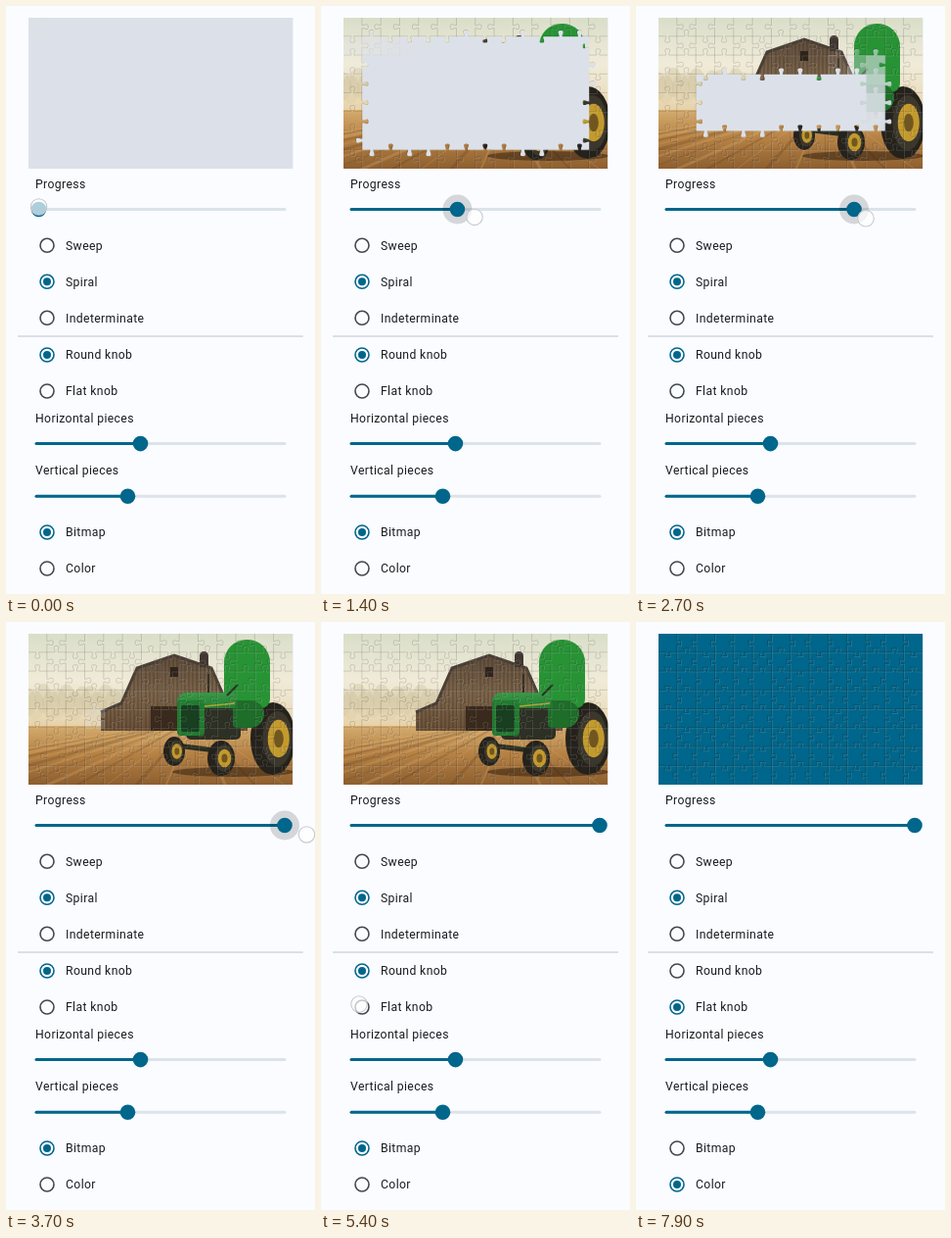
Write an HTML page with a canvas that moves like this. It is 316 px wide and 600 px high and loops after 8000 ms.

```html
<!DOCTYPE html>
<html lang="en">
<head>
<meta charset="utf-8">
<title>Puzzle progress</title>
<style>
  html, body { margin: 0; width: 100%; height: 100%; overflow: hidden; background: #fafcff; }
  svg, canvas { position: absolute; display: block; }
  svg { left: 0; top: 0; }
  canvas { left: 23px; top: 12px; width: 271px; height: 154px; }
  text { font: 12.2px Roboto, sans-serif; letter-spacing: .38px; fill: #191c1e; }
</style>
</head>
<body>
<canvas id="puzzle"></canvas>
<svg id="ui" width="316" height="600" viewBox="0 0 316 600"></svg>
<script>
const LOOP = 8000, COLS = 14, ROWS = 8, W = 270.4, H = 154;
const CW = W / COLS, CH = H / ROWS, COUNT = COLS * ROWS, FADE = 6;
const ACCENT = '#00668b', TRACK = '#dce3e9', EMPTY = '#dce1e9';
const FLAT_AT = 5800, COLOR_AT = 7300, RELEASE_AT = 4300;
const KNOB_LAG = 200, PUZZLE_LAG = 160, MIN_X = 31, MAX_X = 285;

const clamp = (v, a = 0, b = 1) => Math.min(b, Math.max(a, v));
const ramp = (t, start, length) => clamp((t - start) / length);
// Rises from `start`, falls from `end`
const pulse = (t, start, end, fadeIn, fadeOut) =>
  ramp(t, start, fadeIn) * (1 - ramp(t, end, fadeOut));

/* ---------- controls ---------- */
const ui = document.getElementById('ui');
function set(el, attrs) {
  for (const k in attrs) el.setAttribute(k, attrs[k]);
}
function add(tag, attrs, text) {
  const el = document.createElementNS('http://www.w3.org/2000/svg', tag);
  set(el, attrs);
  if (text) el.textContent = text;
  return ui.appendChild(el);
}
const label = (x, y, text) => add('text', { x, y: y + 4.4 }, text);
const haloAt = (cx, cy) => add('circle', { cx, cy, r: 15, fill: '#191c1e', opacity: 0 });

function slider(y, x, title) {
  const line = { x1: 31, x2: 285, y1: y, y2: y, 'stroke-width': 3, 'stroke-linecap': 'round' };
  label(30, y - 26.4, title);
  add('line', { ...line, stroke: TRACK });
  const bar = add('line', { ...line, x2: x, stroke: ACCENT });
  const halo = haloAt(x, y);
  const knob = add('circle', { cx: x, cy: y, r: 7.8, fill: ACCENT });
  return { bar, halo, knob };
}

function radio(y, text) {
  const halo = haloAt(42, y);
  const ring = add('circle', { cx: 42, cy: y, r: 7, fill: 'none', 'stroke-width': 1.6 });
  const dot = add('circle', { cx: 42, cy: y, fill: ACCENT });
  label(61, y, text);
  const select = amount => {
    set(ring, { stroke: amount > 0 ? ACCENT : '#41484d' });
    set(dot, { r: 4 * amount });
  };
  select(0);
  return { halo, select };
}

add('line', { x1: 12, x2: 304, y1: 337, y2: 337, stroke: '#d2d6de', 'stroke-width': 1.5 });
const progress = slider(207.5, MIN_X, 'Progress');
slider(446.6, 137.5, 'Horizontal pieces');
slider(500.2, 124.5, 'Vertical pieces');
const [, spiral] = ['Sweep', 'Spiral', 'Indeterminate'].map((s, i) => radio(244.3 + 37 * i, s));
const [round, flat] = ['Round knob', 'Flat knob'].map((s, i) => radio(356 + 37 * i, s));
const [bitmap, color] = ['Bitmap', 'Color'].map((s, i) => radio(537 + 37 * i, s));
spiral.select(1);
const pointer = add('circle', {
  r: 8.2, fill: '#fff', 'fill-opacity': .68, stroke: '#c6cad2', 'stroke-width': 1.1
});

/* ---------- jigsaw geometry ---------- */
function sign(c, r, k) {
  const n = Math.sin(c * 12.9898 + r * 78.233 + k * 37.719) * 43758.5453;
  return n - Math.floor(n) < .5 ? -1 : 1;
}
const across = (c, r) => r % ROWS ? sign(c, r, 1) : 0;
const down = (c, r) => c % COLS ? sign(c, r, 2) : 0;

// Side of a piece with a round or flat knob; s is the knob's direction, 0 for none
function edge(p, x0, y0, x1, y1, s, isFlat) {
  const dx = x1 - x0, dy = y1 - y0;
  const on = (u, v) => [x0 + dx * u - dy * v * s, y0 + dy * u + dx * v * s];
  if (s) {
    p.lineTo(...on(.42, 0));
    if (isFlat) {
      p.lineTo(...on(.36, .2));
      p.lineTo(...on(.64, .2));
      p.lineTo(...on(.58, 0));
    } else {
      p.bezierCurveTo(...on(.46, .1), ...on(.24, .33), ...on(.5, .33));
      p.bezierCurveTo(...on(.76, .33), ...on(.54, .1), ...on(.58, 0));
    }
  }
  p.lineTo(x1, y1);
}

function addPiece(p, [c, r]) {
  const l = c * CW, t = r * CH, x = l + CW, y = t + CH;
  p.moveTo(l, t);
  edge(p, l, t, x, t, across(c, r));
  edge(p, x, t, x, y, down(c + 1, r));
  edge(p, x, y, l, y, -across(c, r + 1));
  edge(p, l, y, l, t, -down(c, r));
  p.closePath();
}

const order = [];
for (let k = 0; k < ROWS / 2; k++) {
  const right = COLS - 1 - k, bottom = ROWS - 1 - k;
  for (let c = k; c <= right; c++) order.push([c, k]);
  for (let r = k + 1; r <= bottom; r++) order.push([right, r]);
  for (let c = right - 1; c >= k; c--) order.push([c, bottom]);
  for (let r = bottom - 1; r > k; r--) order.push([k, r]);
}

/* ---------- pictures ---------- */
const DPR = window.devicePixelRatio || 1;
function prepare(cv) {
  cv.width = Math.round(271 * DPR);
  cv.height = Math.round(H * DPR);
  const g = cv.getContext('2d');
  g.scale(DPR, DPR);
  return g;
}

function paintFarm(g) {
  const shade = (y0, y1, ...stops) => {
    const grad = g.createLinearGradient(0, y0, 0, y1);
    stops.forEach((s, i) => grad.addColorStop(i / (stops.length - 1), s));
    return grad;
  };
  const box = (style, x, y, w, h, r = 0) => {
    g.fillStyle = style;
    g.beginPath();
    g.roundRect(x, y, w, h, r);
    g.fill();
  };
  const oval = (style, x, y, rx, ry) => {
    g.fillStyle = style;
    g.beginPath();
    g.ellipse(x, y, rx, ry, 0, 0, 7);
    g.fill();
  };
  const line = (style, w, x0, y0, x1, y1) => {
    g.strokeStyle = style;
    g.lineWidth = w;
    g.beginPath();
    g.moveTo(x0, y0);
    g.lineTo(x1, y1);
    g.stroke();
  };
  const wheel = (x, y, rx, ry) => {
    oval('#25221c', x, y, rx, ry);
    oval('#3b372c', x + rx * .2, y, rx * .66, ry * .76);
    oval('#c39a2c', x + rx * .25, y, rx * .48, ry * .52);
    oval('#71571f', x + rx * .25, y, rx * .22, ry * .25);
  };

  // sky, hazy trees, field
  box(shade(12, 105, '#d9dec9', '#f0ebd8', '#e9dab8'), 23, 12, W, 96);
  for (let i = 0; i < 13; i++) {
    oval('rgba(196,182,142,.3)', 22 + i * 8, 82 + 4 * Math.sin(i * 2.3), 9, 15);
  }
  box(shade(80, 108, 'rgba(236,222,188,0)', 'rgba(229,207,163,.9)'), 23, 80, W, 28);
  box(shade(104, 166, '#d6ae70', '#b58144', '#8d5f30'), 23, 106, W, 60);
  for (let i = 0; i < 17; i++) {
    line(i % 2 ? 'rgba(88,52,20,.22)' : 'rgba(226,180,112,.25)', 1 + i % 3,
      205 - i * 4, 108, 290 - i * 32, 170);
  }

  // barn: a gambrel gable, mirrored about its middle
  const mid = 172, slope = [[0, 34], [38, 47], [54, 83], [75, 92]];
  const roof = new Path2D();
  [...slope].reverse().forEach(([x, y]) => roof.lineTo(mid - x, y));
  slope.forEach(([x, y]) => roof.lineTo(mid + x, y));
  const wall = new Path2D(roof);
  wall.lineTo(mid + 75, 111);
  wall.lineTo(mid - 75, 111);
  g.save();
  g.clip(wall);
  box(shade(34, 111, '#5f4d3c', '#7d664c', '#6b5138'), 97, 30, 150, 82);
  for (let x = 99; x < 247; x += 4) line('rgba(40,28,18,.3)', 1.2, x, 34, x, 111);
  g.restore();
  g.strokeStyle = '#4b4037';
  g.lineWidth = 3;
  g.stroke(roof);
  box('#423831', 198, 30, 9, 16, [5, 5, 0, 0]);
  box('#2f241c', 168, 46, 8, 10);
  box('#3a2a1d', 148, 86, 30, 25);

  // tractor with its round driver
  oval('rgba(45,27,12,.5)', 232, 153, 62, 5);
  wheel(273, 119, 23, 37);
  box('#279335', 223, 18, 47, 70, [23, 23, 9, 9]);
  box('#2d3024', 184, 84, 56, 36, 5);
  box('#1e6e2a', 232, 80, 32, 28, [4, 14, 14, 4]);
  box(shade(71, 90, '#3a9b48', '#217b30'), 175, 72, 60, 16, [9, 4, 2, 2]);
  box('#217b30', 175, 80, 28, 36, 4);
  box('#173f20', 179, 85, 19, 27, 2);
  line('#b4a33a', 1.5, 203, 86, 234, 83);
  line('#2f3328', 2, 207, 72, 207, 53);
  line('#2b2f27', 2, 226, 75, 237, 64);
  line('#292d20', 5, 174, 126, 222, 132);
  wheel(172, 132, 11, 15);
  wheel(220, 139, 14, 18);
}

function makePicture(isFlat, isColor) {
  const cv = document.createElement('canvas'), g = prepare(cv);
  g.beginPath();
  g.rect(0, 0, W, H);
  g.clip();
  if (isColor) {
    g.fillStyle = ACCENT;
    g.fillRect(0, 0, W, H);
  } else {
    g.save();
    g.translate(-23, -12);
    paintFarm(g);
    g.restore();
  }
  const cuts = new Path2D();
  for (let r = 0; r < ROWS; r++) {
    for (let c = 0; c < COLS; c++) {
      const x = c * CW, y = r * CH;
      if (r) { cuts.moveTo(x, y); edge(cuts, x, y, x + CW, y, across(c, r), isFlat); }
      if (c) { cuts.moveTo(x, y); edge(cuts, x, y, x, y + CH, down(c, r), isFlat); }
    }
  }
  g.lineWidth = .7;
  g.translate(.4, .4);
  g.strokeStyle = 'rgba(255,255,255,.2)';
  g.stroke(cuts);
  g.translate(-.8, -.8);
  g.strokeStyle = `rgba(20,18,12,${isColor ? .36 : .22})`;
  g.stroke(cuts);
  return cv;
}

const pictures = {
  round: makePicture(false, false),
  flat: makePicture(true, false),
  color: makePicture(true, true)
};
const stage = prepare(document.getElementById('puzzle'));

function drawPieces(pieces, alpha) {
  const p = new Path2D();
  pieces.forEach(q => addPiece(p, q));
  stage.save();
  stage.clip(p);
  stage.globalAlpha = alpha;
  stage.drawImage(pictures.round, 0, 0, 271, H);
  stage.restore();
}

function drawPuzzle(t, done) {
  stage.clearRect(0, 0, 271, H);
  if (done === 1) {
    const kind = t < FLAT_AT ? 'round' : t < COLOR_AT ? 'flat' : 'color';
    stage.drawImage(pictures[kind], 0, 0, 271, H);
    return;
  }
  stage.fillStyle = EMPTY;
  stage.fillRect(0, 0, W, H);
  const head = done * (COUNT + FADE);
  const full = Math.max(0, Math.floor(head - FADE) + 1);
  if (full) drawPieces(order.slice(0, full), 1);
  for (let i = full; i < COUNT && i < head; i++) {
    drawPieces([order[i]], ((head - i) / FADE) ** 2);
  }
}

/* ---------- motion ---------- */
// The finger drags right in three strokes
const dragX = t => 33.5 + 123.5 * ramp(t, 0, 1400) + 78 * ramp(t, 1400, 1300) + 72.5 * ramp(t, 2700, 1000);
const dragY = t => 217 - 12 * Math.exp(-t / 700);
const knobX = t => clamp(dragX(t - KNOB_LAG), MIN_X, MAX_X);
const tapped = (t, at) => pulse(t, at - 550, at, 150, 150);
const ripple = (t, at) => .1 * pulse(t, at - 300, at + 100, 150, 450);

function render(t) {
  const x = knobX(t);
  set(progress.bar, { x2: x });
  set(progress.knob, { cx: x });
  set(progress.halo, { cx: x, opacity: .17 * pulse(t, 100, RELEASE_AT, 150, 300) });

  const dragging = t < RELEASE_AT + 100;
  const [cx, cy] = dragging ? [dragX(t), dragY(t)] : t < FLAT_AT + 500 ? [39, 390] : [40, 572];
  const opacity = dragging ? 1 - ramp(t, RELEASE_AT, 100) : tapped(t, FLAT_AT) + tapped(t, COLOR_AT);
  set(pointer, { cx, cy, opacity });

  const toFlat = ramp(t, FLAT_AT, 100), toColor = ramp(t, COLOR_AT, 100);
  round.select(1 - toFlat);
  flat.select(toFlat);
  bitmap.select(1 - toColor);
  color.select(toColor);
  set(flat.halo, { opacity: ripple(t, FLAT_AT) });
  set(color.halo, { opacity: ripple(t, COLOR_AT) });

  drawPuzzle(t, ramp(knobX(t - PUZZLE_LAG), MIN_X, MAX_X - MIN_X));
}

function tick() {
  render(performance.now() % LOOP);
  requestAnimationFrame(tick);
}
tick();
</script>
</body>
</html>
```
